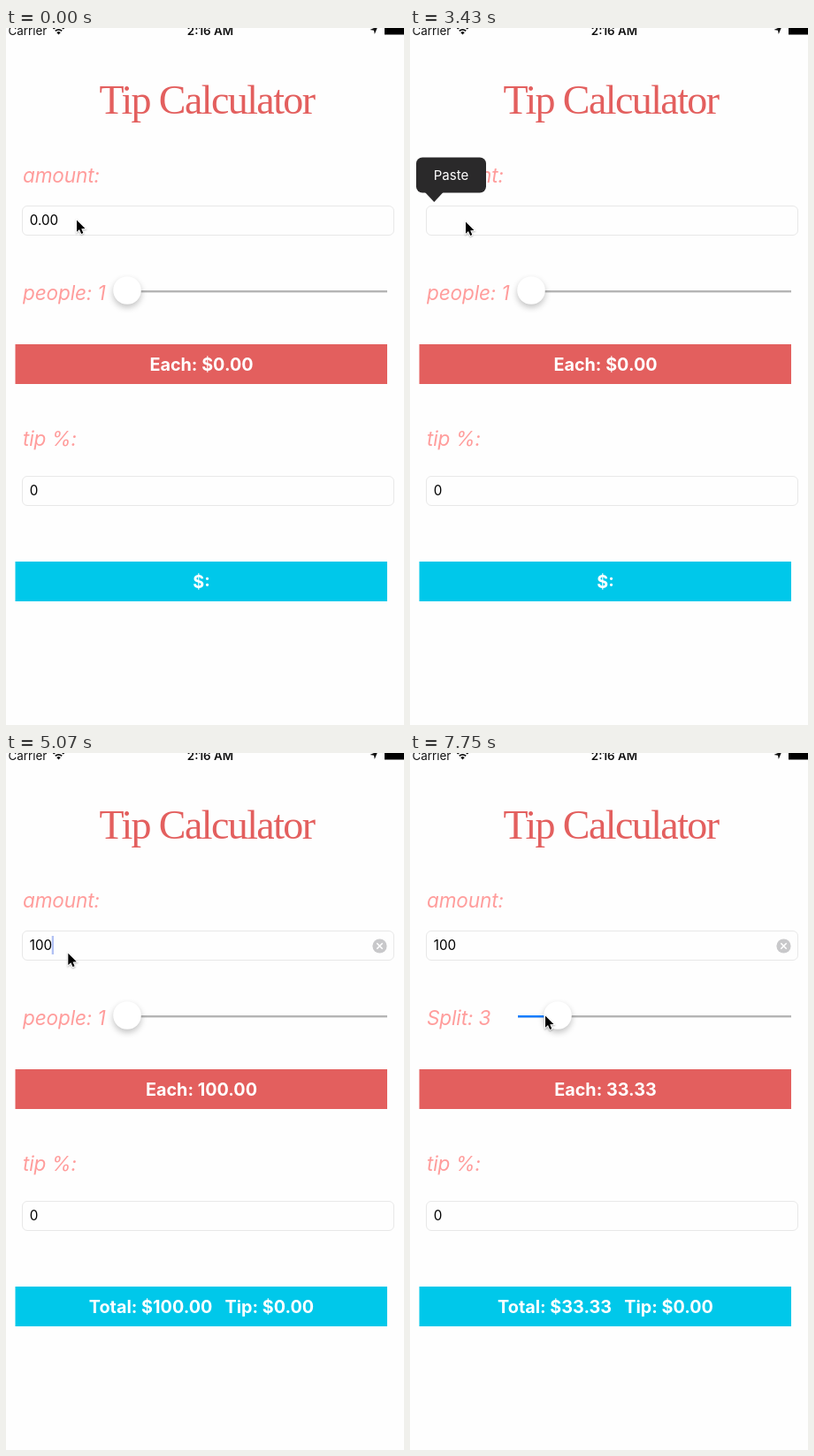
Recreate the animation shown at these times as an HTML page with a canvas. Size 450 by 789 pixels, loop 8 s.

```html
<!DOCTYPE html>
<html lang="en">
<head>
<meta charset="utf-8">
<title>Tip Calculator</title>
<style>
html, body { margin: 0; width: 100%; height: 100%; overflow: hidden; background: #fefefe; }
canvas { display: block; width: 450px; height: 789px; }
</style>
</head>
<body>
<canvas id="stage"></canvas>
<script>
const W = 450, H = 789, LOOP = 8000, STEP = 148.8;
const FOCUS = 300, MENU = 1050, TYPE = 3580, KEY_GAP = 220, SPLIT = 6250;
const SANS = 'Inter, Roboto, sans-serif';
const SERIF = '"Liberation Serif", "Noto Serif", serif';
const RED = '#e35f5e', PINK = '#ff9d9c', CYAN = '#00c8ea';

const canvas = document.getElementById('stage');
const ctx = canvas.getContext('2d');
const dpr = window.devicePixelRatio || 1;
canvas.width = W * dpr;
canvas.height = H * dpr;

const clamp = v => Math.min(1, Math.max(0, v));
const progress = (t, from, to) => clamp((t - from) / (to - from));
const ease = p => p * p * (3 - 2 * p);

// Pointer: rests, then glides to the next spot
const rest = { x: 79.5, y: 217 };
const glides = [
  { from: 150, to: 450, x: 59.5, y: 216.5 },
  { from: 1880, to: 2390, x: 62.5, y: 219 },
  { from: 4960, to: 5840, x: 134.5, y: 290 },
  { from: 6200, to: 6320, x: 149, y: 294 },
  { from: 7400, to: 7750, x: 152.5, y: 297 }
];

function pointer(t) {
  return glides.reduce((pos, g) => {
    const p = ease(progress(t, g.from, g.to));
    return { x: pos.x + (g.x - pos.x) * p, y: pos.y + (g.y - pos.y) * p };
  }, rest);
}

// Blinks once a second, stays lit while typing and then restarts
function caretAlpha(t) {
  if (t < FOCUS) return 0;
  if (t > TYPE && t < TYPE + 850) return 1;
  const peak = t < TYPE ? 100 : 430;
  return clamp(1 + 2 * Math.cos((t - peak) / 1000 * Math.PI * 2));
}

function amount(t) {
  if (t < FOCUS) return '0.00';
  return '100'.slice(0, Math.max(0, Math.floor((t - TYPE) / KEY_GAP) + 1));
}

const menuAlpha = t => progress(t, MENU, MENU + 250) - progress(t, TYPE, TYPE + 150);

function text(str, x, y, size, color, { style = '400', family = SANS, align = 'left', gap = 0 } = {}) {
  ctx.font = `${style} ${size}px ${family}`;
  ctx.letterSpacing = gap + 'px';
  ctx.textAlign = align;
  ctx.fillStyle = color;
  ctx.fillText(str, x, y);
  return ctx.measureText(str).width;
}

function label(str, y) {
  text(str, 19, y, 22.6, PINK, { style: 'italic 400', gap: -0.15 });
}

function rect(x, y, w, h, color) {
  ctx.fillStyle = color;
  ctx.fillRect(x, y, w, h);
}

function disc(x, y, r, color) {
  ctx.fillStyle = color;
  ctx.beginPath();
  ctx.arc(x, y, r, 0, Math.PI * 2);
  ctx.fill();
}

function poly(points) {
  ctx.beginPath();
  points.forEach(([x, y]) => ctx.lineTo(x, y));
  ctx.closePath();
}

function statusBar() {
  text('Carrier', 2.5, 7.5, 13.4, '#111');
  text('2:16 AM', 231, 7.5, 13.4, '#111', { style: '600', align: 'center' });
  ctx.strokeStyle = '#111';
  ctx.lineWidth = 1.8;
  for (const r of [5.2, 8.6]) {
    ctx.beginPath();
    ctx.arc(59.5, 7, r, -Math.PI * 0.75, -Math.PI * 0.25);
    ctx.stroke();
  }
  ctx.fillStyle = '#111';
  ctx.beginPath();
  ctx.moveTo(59.5, 7.6);
  ctx.arc(59.5, 7, 2.8, -Math.PI * 0.78, -Math.PI * 0.22);
  ctx.fill();
  poly([[420.5, -2], [416.8, 7], [416, 2.7], [411.5, 2]]);
  ctx.fill();
  rect(428, -2, 22, 9.5, '#000');
}

function field(y, value) {
  ctx.beginPath();
  ctx.roundRect(18.5, y, 420, 33, 5.5);
  ctx.fillStyle = '#fefefe';
  ctx.fill();
  ctx.strokeStyle = '#e8e8e8';
  ctx.lineWidth = 1;
  ctx.stroke();
  return text(value, 26.7, y + 21.8, 15.2, '#000');
}

function banner(y, color, str) {
  rect(10.5, y, 420.5, 45, color);
  text(str, 221, y + 29.6, 19.8, '#fff', { style: '700', align: 'center' });
}

function clearButton() {
  disc(422.5, 218.5, 8.1, '#c8c8ca');
  ctx.strokeStyle = '#fff';
  ctx.lineWidth = 1.6;
  ctx.beginPath();
  for (const s of [-1, 1]) {
    ctx.moveTo(422.5 - 3.2, 218.5 - 3.2 * s);
    ctx.lineTo(422.5 + 3.2, 218.5 + 3.2 * s);
  }
  ctx.stroke();
}

function slider(count) {
  const x = 137 + (count - 1) * 15;
  rect(122, 297, 309, 2.4, '#b5b5b5');
  if (count > 1) rect(122, 297, x - 122, 2.4, '#0a7cff');
  ctx.save();
  ctx.shadowColor = 'rgba(0,0,0,0.24)';
  ctx.shadowBlur = 7 * dpr;
  ctx.shadowOffsetY = 3.5 * dpr;
  disc(x, 297, 15.8, '#fff');
  ctx.restore();
}

function pasteMenu(alpha) {
  ctx.save();
  ctx.globalAlpha = alpha;
  ctx.fillStyle = '#2a292a';
  ctx.beginPath();
  ctx.roundRect(7, 146.5, 79, 40, 7);
  ctx.fill();
  poly([[17, 186], [37.5, 186], [27.3, 197]]);
  ctx.fill();
  text('Paste', 46.5, 172, 15, '#fff', { align: 'center' });
  ctx.restore();
}

function arrow({ x, y }) {
  ctx.save();
  ctx.translate(x + 0.5, y + 0.5);
  poly([[0, 0], [0, 13.3], [3, 10.6], [5.2, 15.4], [7.3, 14.5], [5.2, 9.8], [9.5, 9.5]]);
  ctx.shadowColor = 'rgba(0,0,0,0.3)';
  ctx.shadowBlur = 2 * dpr;
  ctx.shadowOffsetY = dpr;
  ctx.strokeStyle = '#fff';
  ctx.lineWidth = 1.8;
  ctx.stroke();
  ctx.shadowColor = 'transparent';
  ctx.fillStyle = '#000';
  ctx.fill();
  ctx.restore();
}

function draw(t) {
  const typed = amount(t), count = t < SPLIT ? 1 : 3;
  const entered = Number(typed) > 0;
  const share = (Number(typed) / count).toFixed(2);

  ctx.setTransform(dpr, 0, 0, dpr, 0, 0);
  rect(0, 0, W, H, '#fefefe');
  statusBar();
  text('Tip Calculator', 105.5, 97, 46, RED, { family: SERIF, gap: -1.6 });

  label('amount:', 175);
  const width = field(201.5, typed);
  if (entered) clearButton();
  ctx.globalAlpha = caretAlpha(t);
  rect(26.4 + width, 207, 2.2, 21, '#4468e4');
  ctx.globalAlpha = 1;

  label(`${count > 1 ? 'Split' : 'people'}: ${count}`, 307.7);
  slider(count);
  banner(358, RED, entered ? `Each: ${share}` : 'Each: $0.00');

  label('tip %:', 473);
  field(507.5, '0');
  banner(604, CYAN, entered ? `Total: $${share}   Tip: $0.00` : '$:');

  pasteMenu(menuAlpha(t));
  arrow(pointer(t));
}

// The screen refreshes in coarse steps; each shows the middle of its interval
const start = performance.now();
function tick() {
  const t = (performance.now() - start) % LOOP;
  draw((Math.floor(t / STEP) + 0.5) * STEP);
  requestAnimationFrame(tick);
}
tick();
</script>
</body>
</html>
```
